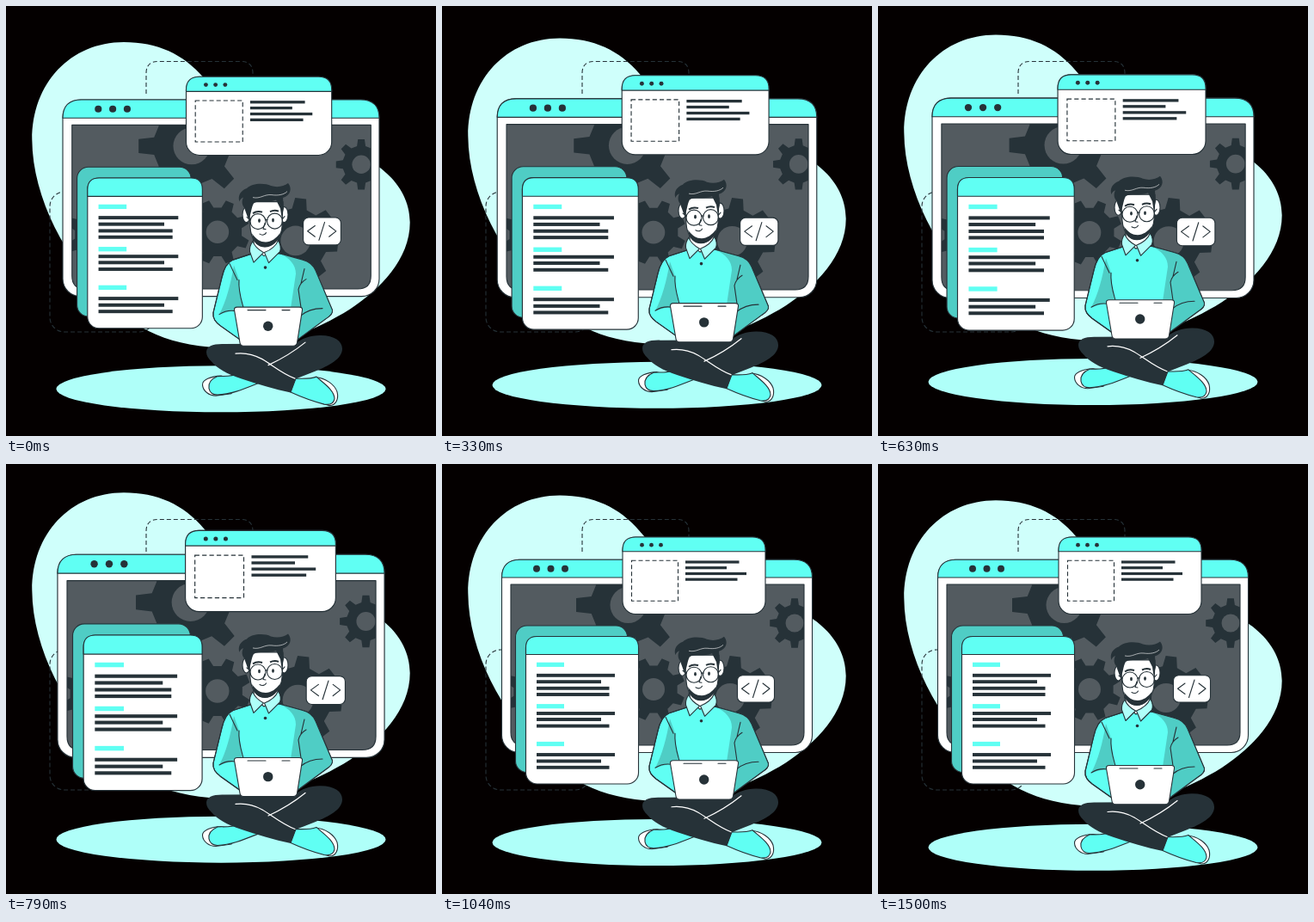
Write an HTML page that moves like this. It is 500 px wide and 500 px high and loops after 1540 ms.

```html
<!DOCTYPE html>
<html lang="en">
<head>
<meta charset="utf-8">
<title>Developer at work</title>
<style>
  html, body { margin: 0; width: 100%; height: 100%; overflow: hidden; background: #040000; }
  svg { display: block; width: 100vw; height: 100vh; }
  .main { transform-origin: 250px 223.3px; }
  .cards { transform-origin: 236.5px 229px; }
  .ink { fill: #263238; }
  .aqua { fill: #60fff3; }
  .teal { fill: #4fcdc5; }
  .pale { fill: #affff9; }
  .white { fill: #fff; }
  .grey { fill: #535b60; }
  .edge { stroke: #263238; stroke-width: 1.1; stroke-linejoin: round; stroke-linecap: round; }
  .line { fill: none; }
  .dash { fill: none; stroke: #263238; stroke-width: 1.1; stroke-dasharray: 5 3; }
  .seam { fill: none; stroke: #fff; stroke-width: 1.2; stroke-linecap: round; }
</style>
</head>
<body>
<svg viewBox="0 0 500 500">
  <defs>
    <clipPath id="screen"><path d="M80 140H421V312Q421 327 406 327H95Q80 327 80 312Z"/></clipPath>
  </defs>

  <g class="float">
    <path fill="#cffffb" d="M30.300 156C30 90 75 42.300 137 42.300C176 42.300 206 56 230 84C275 138 330 150 385 165C425 175 469.700 205 469.700 252C469.700 295 435 330 400 353C360 378 310 398 262 398C190 398 150 375 120 345C70 295 31 225 30.300 156Z"/>
    <ellipse class="pale" cx="250" cy="445.700" rx="191.500" ry="27"/>
  </g>

  <path class="dash" d="M163 102V78Q163 64.500 177 64.500H273Q287 64.500 287 78V90"/>
  <rect class="dash" x="51" y="216" width="121" height="163" rx="17"/>

  <g class="main">
    <rect class="white edge" x="69.500" y="111.200" width="361" height="224.300" rx="20"/>
    <path class="aqua edge" d="M69.500 132Q69.500 111.200 91 111.200H409Q430.500 111.200 430.500 132Z"/>
    <g class="ink">
      <circle cx="110" cy="121.700" r="4"/><circle cx="126.500" cy="121.700" r="4"/><circle cx="143" cy="121.700" r="4"/>
    </g>
    <g clip-path="url(#screen)">
      <path class="grey" d="M80 140H421V327H80Z"/>
      <g id="gears"></g>
    </g>
    <path class="line edge" d="M80 140H421V312Q421 327 406 327H95Q80 327 80 312Z"/>
  </g>

  <g class="cards">
    <rect class="teal edge" x="85.500" y="188" width="130" height="170.500" rx="13"/>
    <rect class="white edge" x="97.500" y="200.500" width="131" height="171.500" rx="13"/>
    <path class="aqua edge" d="M97.500 221.500V213.500Q97.500 200.500 110.500 200.500H215.500Q228.500 200.500 228.500 213.500V221.500Z"/>
    <rect class="white edge" x="210" y="85" width="166" height="89.500" rx="15"/>
    <path class="aqua edge" d="M210 101.800V100Q210 85 225 85H361Q376 85 376 100V101.800Z"/>
    <g class="ink">
      <circle cx="232.500" cy="94.200" r="2.400"/><circle cx="243.500" cy="94.200" r="2.400"/><circle cx="254.500" cy="94.200" r="2.400"/>
    </g>
    <rect class="dash" x="220.500" y="112.300" width="54" height="47"/>
    <g id="bars"></g>
    <rect class="white edge" x="343.500" y="245.700" width="43" height="31.300" rx="6"/>
    <path class="line edge" d="M357 255L348.500 261.200L357 267.500M368 251L361.500 271.500M373 255L381 261.200L373 267.500"/>
  </g>

  <g class="float">
    <!-- shoes -->
    <path class="white edge" d="M250 430.500C238 431 228 435 228.500 441C229 448 236 453.500 244 453.500L262 451L270 436Z"/>
    <path class="aqua edge" d="M246 431C239 434 235 439 236 445C237 450 241 452.500 246 452.500C262 452 276 446 296 438L270 428C262 432 254 430.500 246 431Z"/>
    <path class="white edge" d="M360 432C371 433 382 440 385 449C387 457 384 465 376 465L355 458Z"/>
    <path class="aqua edge" d="M337 433.500C346 434 354 434 361 431.500C368 438 382 447 382 457C381 463 376 464.500 370 463.500C356 460 343 455 331 449.500Z"/>
    <!-- legs -->
    <path class="ink" d="M233 403C233 396 241 393 254 393.500L336 393C344 387 354 383 366 383.300C382 383.500 391 390 391 399C391 411 375 419 360 425L337 434L331 450C312 446 292 440 274 434C256 428 246 422 239 414C235 410 233 407 233 403Z"/>
    <path class="seam" d="M267 404.500C280 403 289 406 298 411C310 418 321 428 336 433.500M348 391.500C335 402 318 412 305 418"/>
    <!-- sweater -->
    <path class="aqua edge" d="M284 289L264 295.500C256 299 253 307 251 316L241 357C240 364 244 368 249 372L273 389L338 389L372 364C377 361 380 357 379.500 354L360 308C357 301 351 297 345 295.500L318 288Z"/>
    <path class="teal" d="M318 288L345 295.500C351 297 357 301 360 308L379.500 354C380 357 377 361 372 364L338 389L331 352L337 312C337 301 330 294 318 288Z"/>
    <path class="teal" d="M265 302L271 319C271 331 273 340 275 351L266 354L248 359C256 344 261 325 265 302Z"/>
    <path class="line edge" d="M284 289L264 295.500C256 299 253 307 251 316L241 357C240 364 244 368 249 372L273 389M260 300L269 319M271 319C270 331 273 340 276 351M248 359C254 355 260 354 267 355M318 288L345 295.500C351 297 357 301 360 308L379.500 354C380 357 377 361 372 364L338 389M347 306L343 323M349 318C344 321 341 325 340 330L343 351M342 361C350 354 358 352 368 352"/>
    <!-- neck and collar -->
    <path class="white edge" d="M288 267L288 282L300 291L316 281L316 266Z"/>
    <path class="pale edge" d="M287 274C284 278 283 282 283.500 286L288 298.500L299.500 287C294 284 289 280 287 274Z"/>
    <path class="pale edge" d="M316.500 273C319 277 320 282 318.500 286L305.500 299L300.500 287C308 284 314 279 316.500 273Z"/>
    <circle class="ink" cx="301.500" cy="304.500" r="1.800"/>
    <!-- head -->
    <ellipse class="white edge" cx="279.500" cy="243" rx="4.500" ry="9"/>
    <ellipse class="white edge" cx="323.500" cy="243" rx="4.500" ry="9"/>
    <path class="white edge" d="M282 228H322L321 257C320 270 311 280 301 280C291 280 285 271 284 258Z"/>
    <path class="ink" d="M286 265C291 272 296 275 302 275C308 275 314 271 319 264C317 274 310 281 301 281C293 281 287 275 286 265Z"/>
    <path class="ink" d="M282 249L277 235C274 231 274 227 276 223C273 224 272 226 271.500 228C269 221 273 215 280 212.500C286 206 301 206 308 209.500C316 212 323 210 328 206.500C333 212 331 221 322 223.500L323 236L320.500 246L319 236L314 226C304 230 294 226 288 230C285 235 285 243 282 249Z"/>
    <path class="line" stroke="#fff" stroke-width=".6" d="M287 223C296 225 300 219 309 220C316 221 323 220 327 216"/>
    <g class="line edge">
      <circle cx="293" cy="251" r="9"/><circle cx="312.500" cy="250.500" r="9"/>
      <path d="M302 249.500Q303 248 304 249M284 249L280 246M321.500 248L324 245M301 253L299 259.500L302 260M295 265.500C298 267.500 301 266.500 302.500 264"/>
    </g>
    <path class="line" stroke="#263238" stroke-width="2" d="M287 241.500Q292 238 298 240M307 239.500Q312 237 317 239"/>
    <ellipse class="ink" cx="294.500" cy="250" rx="1.400" ry="2.300"/>
    <ellipse class="ink" cx="310.500" cy="249.500" rx="1.400" ry="2.300"/>
    <!-- laptop -->
    <path class="white edge" d="M269 350.500H341Q345 350.500 344.500 354L338.500 392Q338 395.500 334 395.700L276 395.700Q272.500 395.500 272 392L265.500 354Q265 350.500 269 350.500Z"/>
    <path class="line edge" d="M281 354H302M321 354H330"/>
    <circle class="ink" cx="304.700" cy="372.700" r="5.700"/>
  </g>
</svg>
<script>
  const $ = s => document.querySelector(s);
  const all = s => [...document.querySelectorAll(s)];

  // Eight-toothed gear with a round hub.
  function gear(x, y, outer, root, hub, turn = 0) {
    const pts = [];
    for (let i = 0; i < 8; i++) {
      const mid = i * Math.PI / 4 + turn * Math.PI / 180;
      for (const [r, a] of [[root, -.23], [outer, -.13], [outer, .13], [root, .23]]) {
        pts.push((x + r * Math.cos(mid + a)).toFixed(1) + ',' + (y + r * Math.sin(mid + a)).toFixed(1));
      }
    }
    return `<polygon class="ink" points="${pts.join(' ')}"/><circle class="grey" cx="${x}" cy="${y}" r="${hub}"/>`;
  }

  const bar = (kind, x, right, y, h) =>
    `<rect class="${kind}" x="${x}" y="${y - h / 2}" width="${right - x}" height="${h}"/>`;

  $('#gears').innerHTML =
    gear(216.5, 164, 61, 44, 21) + gear(246, 262, 37, 28, 13, 22.5) +
    gear(335, 272, 49, 37, 17, 7) + gear(410, 185, 29, 21.5, 10.5) +
    gear(112, 265, 38, 29, 13, 22.5);

  const paragraphs = [
    [233.3, [[245.8, 201], [253.2, 185], [260.8, 194.5], [268, 194.5]]],
    [281.7, [[290, 201], [297, 185], [304.6, 194.5]]],
    [325.5, [[338, 201], [345.5, 185], [352.8, 194.5]]]
  ];
  const notes = [[114, 345.5], [120.7, 331], [127.5, 354], [134.2, 343.5]];
  $('#bars').innerHTML =
    paragraphs.map(([y, rows]) => bar('aqua', 110, 142, y, 5.2) +
      rows.map(([ry, end]) => bar('ink', 110, end, ry, 3.9)).join('')).join('') +
    notes.map(([y, end]) => bar('ink', 283, end, y, 3.2)).join('');

  const LOOP = 1540, CYCLE = 1500, STEP = 1000 / 24, LEAD = 29;
  const beat = [[0, 1], [.1, 1.1], [.3, 1], [.4, 1], [.5, 1.1], [.6, 1], [1, 1]];
  const hover = [[0, 0], [.5, -10], [1, 0]];

  function tween(keys, p) {
    const i = Math.max(1, keys.findIndex(k => k[0] >= p));
    const [p0, v0] = keys[i - 1], [p1, v1] = keys[i];
    return v0 + (v1 - v0) * (p - p0) / (p1 - p0);
  }

  const floats = all('.float'), beats = all('.main, .cards');
  const start = performance.now();

  function draw() {
    const t = (performance.now() - start) % LOOP;
    const step = Math.min(36, Math.floor((t + 5) / STEP));
    const p = Math.min(1, (step * STEP + LEAD) / CYCLE);
    const dy = tween(hover, p), scale = tween(beat, p);
    for (const el of floats) el.style.transform = `translateY(${dy}px)`;
    for (const el of beats) el.style.transform = `scale(${scale})`;
    requestAnimationFrame(draw);
  }
  draw();
</script>
</body>
</html>
```
